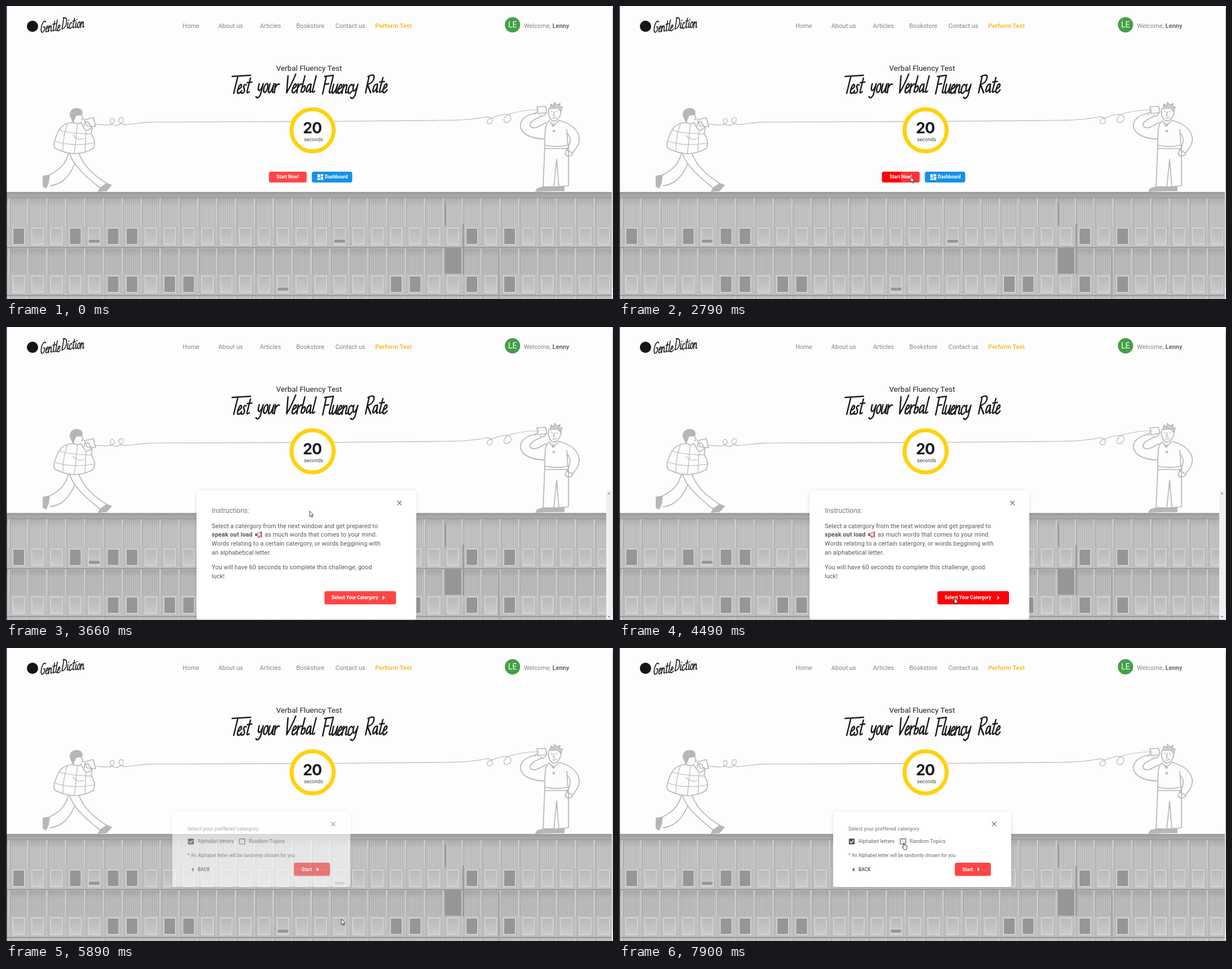
Write an HTML page that moves like this. It is 1077 by 520 pixels and loops after 8000 ms.

```html
<!DOCTYPE html>
<html lang="en">
<head>
<meta charset="utf-8">
<title>Verbal Fluency Test</title>
<style>
html, body { margin: 0; width: 100%; height: 100%; overflow: hidden; background: #fdfdfd; }
svg { display: block; width: 1077px; height: 520px; font-family: Roboto, "Liberation Sans", sans-serif; }
.b { font-weight: 700; }
.nav { font-size: 11px; fill: #858585; }
.btn { font-size: 8.4px; font-weight: 700; fill: #fff; }
.body { font-size: 10.8px; letter-spacing: .1px; fill: #585858; }
.small { font-size: 9.2px; fill: #666; }
.note { font-size: 8.3px; }
.line { fill: none; stroke: #b6b6b6; stroke-width: 1.7; stroke-linecap: round; stroke-linejoin: round; }
.thin { stroke-width: 1.2; }
.ink { fill: none; stroke: #1b1b1b; stroke-width: 2.5; stroke-linecap: round; stroke-linejoin: round; }
.panel { fill: #fff; filter: drop-shadow(0 1px 3px rgba(0, 0, 0, .12)); }

.anim { animation: 8s linear infinite both; }
.pointer { animation-name: pointer; }
.arrow { animation-name: arrow; animation-timing-function: step-end; }
.hand, .halo { animation-name: hand; animation-timing-function: step-end; }
.actions { animation-name: actions; animation-timing-function: step-end; }
.track { animation-name: track; animation-timing-function: step-end; }
.startHover { animation-name: startHover; }
.selectHover { animation-name: selectHover; }
.nudge { animation-name: nudge; }
.ripple1 { animation-name: ripple1; }
.ripple2 { animation-name: ripple2; }
.guide { animation-name: guide; }
.choice { animation-name: choice; }

@keyframes pointer {
  0%, 3.5% { transform: translate(1085px, 525px); animation-timing-function: ease-out; }
  10.25%, 16.75% { transform: translate(620px, 321px); animation-timing-function: ease-in-out; }
  23%, 30.875% { transform: translate(511px, 303px); }
  32.875%, 44.875% { transform: translate(517.5px, 303px); }
  45.75% { transform: translate(538.5px, 326px); animation-timing-function: ease-out; }
  55.25%, 83.5% { transform: translate(595px, 481px); animation-timing-function: ease-in-out; }
  91%, 100% { transform: translate(503px, 345px); }
}
@keyframes arrow { 0% { opacity: 1; } 90%, 100% { opacity: 0; } }
@keyframes hand { 0% { opacity: 0; } 90%, 100% { opacity: 1; } }
@keyframes actions { 0% { opacity: 1; } 35.5%, 100% { opacity: 0; } }
@keyframes track { 0% { opacity: 0; } 35.5% { opacity: 1; } 72.5%, 100% { opacity: 0; } }
@keyframes startHover { 0%, 20.5% { fill: #ff4545; } 23%, 100% { fill: #ff0008; } }
@keyframes selectHover { 0%, 52% { fill: #ff4545; } 55%, 100% { fill: #ff0008; } }
@keyframes nudge { 0%, 52% { transform: none; } 55%, 100% { transform: translateX(3px); } }
@keyframes ripple1 {
  0%, 32.875% { transform: scale(0); animation-timing-function: cubic-bezier(.4, 0, .2, 1); }
  39.75%, 100% { transform: scale(1); }
}
@keyframes ripple2 {
  0%, 67.875% { transform: scale(0); animation-timing-function: cubic-bezier(.4, 0, .2, 1); }
  74.75%, 100% { transform: scale(1); }
}
@keyframes guide {
  0%, 35% { opacity: 0; transform: translateX(-320px); animation-timing-function: cubic-bezier(.215, .61, .355, 1); }
  39.5% { opacity: 1; transform: none; animation-timing-function: step-end; }
  72.5%, 100% { opacity: 0; transform: none; }
}
@keyframes choice {
  0%, 72.5% { opacity: 0; transform: translateX(-215px); animation-timing-function: cubic-bezier(.215, .61, .355, 1); }
  77%, 100% { opacity: 1; transform: none; }
}
</style>
</head>
<body>
<svg viewBox="0 0 1077 520">
  <defs>
    <pattern id="ribs" width="3.7" height="8" patternUnits="userSpaceOnUse">
      <rect width="3.7" height="8" fill="#c6c6c6"/>
      <rect width="1.4" height="8" fill="#b5b5b5"/>
    </pattern>
    <linearGradient id="roof" x2="0" y2="1">
      <stop offset="0" stop-color="#9a9a9a"/><stop offset="1" stop-color="#b0b0b0"/>
    </linearGradient>
    <linearGradient id="pane" x2="0" y2="1">
      <stop offset="0" stop-color="#bababa"/><stop offset="1" stop-color="#cacaca"/>
    </linearGradient>
    <linearGradient id="shade" x2="0" y2="1">
      <stop offset="0" stop-color="#000" stop-opacity=".1"/><stop offset=".3" stop-color="#000" stop-opacity="0"/>
    </linearGradient>
    <clipPath id="startClip"><rect x="466.5" y="294" width="67" height="19.3" rx="3.5"/></clipPath>
    <clipPath id="selectClip"><rect x="565" y="468.7" width="127" height="23.6" rx="3.5"/></clipPath>
  </defs>
  <rect width="1077" height="520" fill="#fdfdfd"/>

  <!-- Header -->
  <circle cx="47" cy="36" r="10" fill="#151515"/>
  <g id="brand" class="ink" role="img" aria-label="Gentle Diction"/>
  <g class="nav">
    <text x="313.3" y="38.5">Home</text>
    <text x="376.7" y="38.5">About us</text>
    <text x="450.5" y="38.5">Articles</text>
    <text x="515" y="38.5">Bookstore</text>
    <text x="584.5" y="38.5">Contact us</text>
    <text x="655" y="38.5" class="b" fill="#f6bd37">Perform Test</text>
    <text x="919" y="39">Welcome, <tspan class="b" fill="#686868">Lenny</tspan></text>
  </g>
  <circle cx="898.7" cy="33.3" r="13.6" fill="#43a047"/>
  <text x="898.7" y="38.4" font-size="14" fill="#fff" text-anchor="middle">LE</text>

  <text x="479.3" y="114.7" font-size="13.5" fill="#222">Verbal Fluency Test</text>
  <g id="headline" class="ink" role="img" aria-label="Test your Verbal Fluency Rate"/>

  <!-- String between the cups -->
  <path class="line thin" d="M159 210C174 211 186 213 191 207C195 200 186 196 185 203C185 212 197 214 203 209C212 203 208 195 202 199C196 205 205 212 216 210C232 209 243 206 258 206L540 205L768 203C800 203 832 201 850 197C861 195 866 203 861 208C854 213 850 203 858 200C870 196 886 189 894 194C900 202 890 210 885 206C880 200 888 192 899 190C915 186 930 184 946 184"/>

  <!-- Left figure -->
  <g class="line">
    <path fill="#b6b6b6" d="M114 195C113 185 120 181 127 182C133 182 137 188 134 193L124 194L119 206Z"/>
    <path d="M134 193L137 200L134 202M119 206C124 210 130 209 133 207M139 202L155 198L159 214L144 213Z"/>
    <path d="M119 207C104 207 95 214 90 229C85 240 83 249 88 253C100 259 112 262 122 262C134 262 148 258 155 252C160 243 156 233 151 227L153 216M133 207C136 212 138 218 142 220C148 222 150 216 152 215L146 206C142 204 138 207 139 213"/>
    <path class="thin" d="M94 220C113 226 130 227 151 227M87 240C108 247 130 248 157 243M109 209C102 228 101 245 101 257M127 210C124 228 124 245 121 262M142 221C141 235 141 248 140 258M119 229C123 236 131 238 139 235"/>
    <path d="M111 261C106 278 99 289 77 300M78 319C95 317 110 308 122 280M113 262C119 282 139 301 167 323M129 261C138 284 155 300 179 315"/>
    <path fill="#b6b6b6" d="M66 302L77 300L75 314L71 323L66 320Z M167 323L179 315L187 318L178 328L164 329Z"/>
  </g>

  <!-- Right figure -->
  <g class="line">
    <path fill="#d0d0d0" d="M965 182L967 174L972 178L973 171L978 176L983 173L982 179L987 179L984 187L979 181Z"/>
    <path d="M963 182C962 190 963 200 970 204C978 205 984 198 985 185M968 187L969 188M977 187L978 188M973 188L971 194L974 195M970 199L977 198"/>
    <path d="M942 179L957 178L960 189L944 191ZM944 186L939 192M958 190C956 195 951 197 948 194"/>
    <path d="M940 190C920 194 911 204 913 215C916 230 938 236 956 236M949 196C935 202 926 208 931 214C938 220 948 212 958 207M964 204C957 208 956 217 956 247C970 250 984 250 997 247L995 219M981 203C997 207 1011 215 1016 229C1020 242 1014 250 1005 261M995 225C1004 234 1002 243 995 255"/>
    <path d="M995 255L992 263L997 267L1005 264L1005 261ZM965 205L971 213L980 204"/>
    <circle cx="971" cy="211" r="2"/><circle cx="972" cy="222" r="1.5"/>
    <path d="M956 247L953 321L972 321L977 272L981 321L998 319L998 247M956 253H997"/>
    <path fill="#b6b6b6" d="M953 321L972 321L970 328L940 329L943 324Z M974 321L990 320L990 328L969 328Z"/>
  </g>

  <!-- Counter -->
  <circle cx="544" cy="220.7" r="37.4" fill="#fff" stroke="#ffd20a" stroke-width="7"/>
  <text x="543.4" y="226.4" text-anchor="middle" font-size="26.8" font-weight="650" letter-spacing="-.9" fill="#1b1b24" font-family="Inter, sans-serif">20</text>
  <text x="528.7" y="239.6" font-size="9" fill="#444">seconds</text>

  <g id="facade"/>

  <!-- Page edges -->
  <rect width="1.4" height="520" fill="#161616"/>
  <rect x="1075" width="2" height="520" fill="#f1f1f1"/>
  <rect x="1076" y="5" width="1" height="495" fill="#c2c2c2"/>

  <!-- Main buttons -->
  <g class="anim actions">
    <rect class="anim startHover" x="466.5" y="294" width="67" height="19.3" rx="3.5"/>
    <g clip-path="url(#startClip)"><g transform="translate(518 303.5)"><circle class="anim ripple1" r="54" fill="#fff" fill-opacity=".2"/></g></g>
    <text class="btn" x="480" y="306.3">Start Now!</text>
    <rect x="542.7" y="294" width="71.6" height="19.3" rx="3.5" fill="#1692e6"/>
    <path fill="#fff" d="M552.5 298.5h4.6v5.8h-4.6zM558.3 298.5h4.6v3.4h-4.6zM552.5 305.5h4.6v3.4h-4.6zM558.3 303.1h4.6v5.8h-4.6z"/>
    <text class="btn" x="565.8" y="306.3">Dashboard</text>
  </g>

  <g class="anim track">
    <rect x="1065" y="290" width="10" height="229" fill="#f0f0f0"/>
    <path fill="#888" d="M1067.7 296.5h4.6l-2.3-3zM1067.7 513h4.6l-2.3 3z"/>
  </g>

  <!-- Instructions -->
  <g class="anim guide">
    <rect class="panel" x="338" y="290" width="390" height="229" rx="4"/>
    <path stroke="#6a6a6a" stroke-width="1.2" d="M694.2 308.5l7.6 7.6m0-7.6l-7.6 7.6"/>
    <text x="365.3" y="330" font-size="12" fill="#777">Instructions:</text>
    <g class="body">
      <text x="365" y="356.5">Select a catergory from the next window and get prepared to</text>
      <text x="365" y="372.4" class="b">speak out load</text>
      <text x="459" y="372.4">as much words that comes to your mind.</text>
      <text x="365" y="388.2">Words relating to a certain catergory, or words beggining with</text>
      <text x="365" y="404">an alphabetical letter.</text>
      <text x="365" y="430.4">You will have 60 seconds to complete this challenge, good</text>
      <text x="365" y="446.2">luck!</text>
    </g>
    <path fill="#ddd" stroke="#666" stroke-width=".8" d="M445 366.5L452.5 363.5V372.5L445 370.5ZM446.5 371l1 3h2.5l-.6-2.4"/>
    <path fill="#d8403c" d="M442 366.3h3.6v4.6H442zM452.3 363.2h1.8v10h-1.8z"/>
    <rect class="anim selectHover" x="565" y="468.7" width="127" height="23.6" rx="3.5"/>
    <g clip-path="url(#selectClip)"><g transform="translate(595 481)"><circle class="anim ripple2" r="97" fill="#fff" fill-opacity=".22"/></g></g>
    <text class="btn" x="577.8" y="483.2">Select Your Catergory</text>
    <path class="anim nudge" fill="#fff" d="M668.3 476.7l3.8 3.8l-3.8 3.8z"/>
  </g>

  <!-- Category choice -->
  <g class="anim choice">
    <rect class="panel" x="380" y="290" width="316" height="134" rx="4"/>
    <path stroke="#6a6a6a" stroke-width="1.2" d="M661.7 308.5l7.6 7.6m0-7.6l-7.6 7.6"/>
    <g class="small">
      <text x="407" y="324.3" fill="#777">Select your preffered catergory</text>
      <text x="424.5" y="346.4">Alphabet letters</text>
      <text x="515.8" y="346.4">Random Topics</text>
      <text x="407" y="371.2" class="note">* An Alphabet letter will be randomly chosen for you</text>
      <text x="425" y="396.3" class="b note">BACK</text>
    </g>
    <circle class="anim halo" cx="504" cy="343.3" r="10" fill="#000" fill-opacity=".05"/>
    <rect x="407.8" y="338.2" width="10.3" height="10.3" rx="1.2" fill="#555"/>
    <path fill="none" stroke="#fff" stroke-width="1.3" d="M409.8 343.4l2.2 2.3l4.3-4.5"/>
    <rect x="499.3" y="338.7" width="9.3" height="9.3" rx=".8" fill="none" stroke="#666" stroke-width="1.2"/>
    <path fill="#555" d="M417.5 389.7l-3.7 3.7l3.7 3.7z"/>
    <rect x="595.8" y="381" width="64" height="23.4" rx="3.5" fill="#ff4545"/>
    <text class="btn" x="609.3" y="395.6">Start</text>
    <path fill="#fff" d="M636.3 388.9l3.8 3.8l-3.8 3.8z"/>
  </g>

  <!-- Pointer -->
  <g class="anim pointer" fill="#fff" stroke="#2a2a2a" stroke-width=".9" stroke-linejoin="round">
    <path class="anim arrow" d="M0 0V10L2.3 8L3.9 11.6L5.4 10.9L3.9 7.4H7Z"/>
    <path class="anim hand" d="M1.6 1.2Q2.4 .2 3.2 1.2V5L6.2 5.4L7.9 6.2V9.4L6.8 13H2.6L-.7 8.6Q-.2 7.4 1.6 8.6Z"/>
  </g>
</svg>

<script>
const make = (parent, tag, attrs) => {
  const el = document.createElementNS('http://www.w3.org/2000/svg', tag);
  for (const key in attrs) el.setAttribute(key, attrs[key]);
  return parent.appendChild(el);
};
const byId = id => document.getElementById(id);

// Brush letters: advance, then strokes on a baseline of zero.
const letters = {
  T: [13, 'M-1 -30L31 -32M9 -30L8 0'],
  e: [8, 'M1 -7Q7 -9 6 -14Q4 -18 2 -13Q-1 0 4 0Q7 -1 8 -5'],
  s: [7, 'M6 -15Q2 -17 2 -12L5 -6Q6 1 0 -1'],
  t: [8, 'M4 -27L3 -3Q4 1 7 -3M0 -19L8 -20'],
  y: [10, 'M1 -16Q0 -4 4 -4Q7 -6 8 -16L7 4Q4 12 0 7'],
  o: [9, 'M4 -16Q0 -14 1 -5Q2 0 5 -1Q8 -4 7 -12Q6 -17 4 -16'],
  u: [10, 'M1 -16Q0 0 3 0Q7 -2 8 -16L8 -3Q8 0 10 -1'],
  r: [8, 'M1 -16L2 0M2 -9Q4 -17 8 -15'],
  V: [12, 'M0 -30L4 0Q10 -16 13 -33'],
  b: [9, 'M2 -30L1 -2Q7 1 7 -8Q6 -16 2 -9'],
  a: [10, 'M7 -15Q1 -17 1 -5Q2 3 7 -8L7 -15L8 -2Q8 0 10 -2'],
  l: [6, 'M3 -30L2 -3Q3 1 6 -3'],
  F: [11, 'M2 -30L2 1M-1 -30L14 -32M2 -16L9 -17'],
  n: [10, 'M1 -16L1 0M1 -9Q6 -20 7 -12L7 -2Q8 0 10 -2'],
  c: [8, 'M7 -14Q3 -19 1 -9Q1 1 5 0L8 -4'],
  R: [13, 'M2 -30L2 0M0 -29Q13 -36 11 -23Q9 -16 2 -15L11 0'],
  G: [13, 'M11 -27Q5 -35 1 -17Q0 1 6 0Q11 -2 10 -14L6 -14'],
  D: [14, 'M3 -30L2 0Q13 -2 12 -18Q11 -32 1 -30'],
  i: [6, 'M2 -16L2 -3Q3 1 6 -3M3 -23L3 -22']
};
const brush = (parent, word, x, y, pose = '') => {
  const group = make(parent, 'g', { transform: `translate(${x} ${y}) ${pose} skewX(-12)` });
  let pen = 0;
  for (const ch of word) {
    const [advance, d] = letters[ch];
    make(group, 'path', { d, transform: `translate(${pen} 0)` });
    pen += advance;
  }
};
const headline = byId('headline');
brush(headline, 'Test', 396, 155);
brush(headline, 'your', 445, 154);
brush(headline, 'Verbal', 494, 154);
brush(headline, 'Fluency', 560, 155);
brush(headline, 'Rate', 636, 154);
brush(byId('brand'), 'Gentle', 61, 47, 'rotate(-5) scale(.66)');
brush(byId('brand'), 'Diction', 98, 41, 'rotate(-4) scale(.66)');

// Building front
const facade = byId('facade');
const block = (x, y, width, height, fill) => make(facade, 'rect', { x, y, width, height, fill });
const pitch = 33.5;
const bays = Array.from({ length: 32 }, (_, i) => 5.5 + i * pitch);

block(1, 330, 1074, 190, 'url(#ribs)');
block(1, 341, 1074, 50, 'url(#shade)');
block(1, 431, 1074, 45, 'rgba(0,0,0,.04)');
block(1, 431, 1074, 45, 'url(#shade)');
for (const x of bays) {
  block(x - 1.5, 341, 3, 179, '#cbcbcb');
  block(x + 1.5, 341, 1.2, 179, '#a4a4a4');
}
block(1, 330, 1074, 10, 'url(#roof)');
block(1, 339.5, 1074, 1.5, '#989898');

const windowRow = (top, dark, half) => {
  block(1, top, 1074, 36, 'rgba(190,190,190,.6)');
  bays.forEach((bay, i) => {
    const x = bay + 17;
    block(x - 12, top + 1, 24, 33.5, '#a6a6a6');
    block(x - 11.5, top + 1.5, 23, 32.5, '#d4d4d4');
    block(x - 9.5, top + 4, 19, 27.5, dark.includes(i) ? '#969696' : 'url(#pane)');
    if (half.includes(i)) block(x - 9.5, top + 24, 19, 5, '#969696');
  });
  block(1, top + 35, 1074, 1.5, '#cacaca');
  block(1, top + 36.5, 1074, 2.5, '#9c9c9c');
};
windowRow(391, [0, 3, 5, 6, 24, 26], [4, 17]);
windowRow(476, [5, 6, 8, 9, 20, 21, 24, 26], [14]);

block(779, 430, 29, 45, '#969696');
block(779, 348, 2, 42, '#9a9a9a');
block(810, 386, 2.5, 90, '#969696');
block(873, 432, 3, 88, '#a4a4a4');
</script>
</body>
</html>
```
